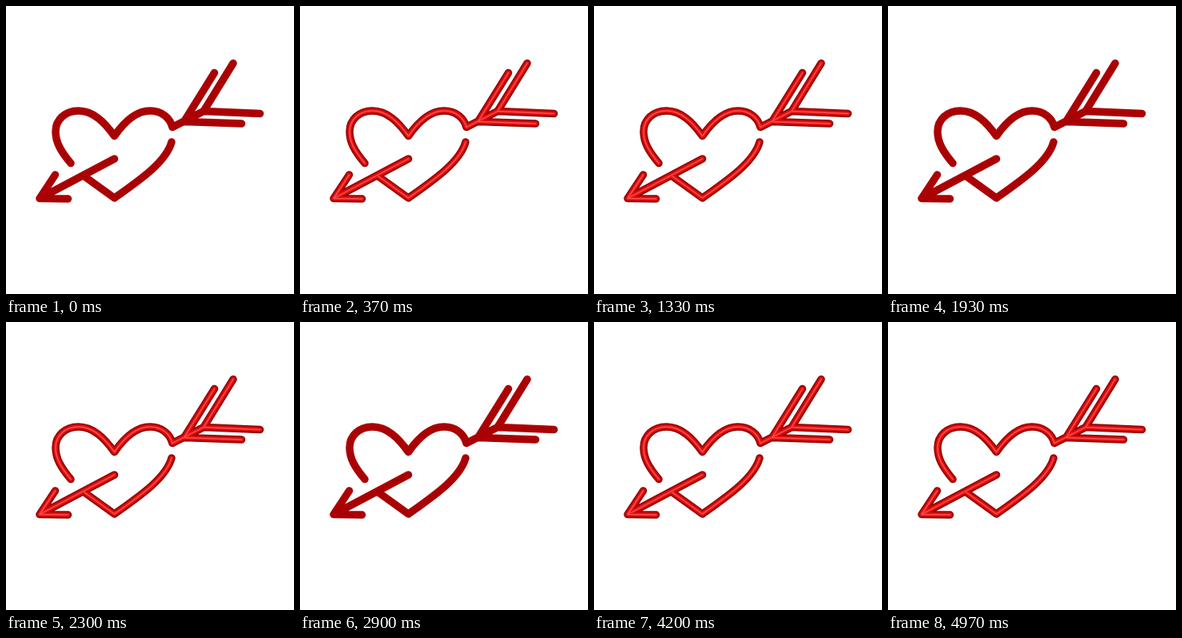
Animation of 360 by 360 pixels, one loop 5.1 s. Source, as an HTML page:

```html
<!DOCTYPE html>
<html lang="en">
<head>
<meta charset="utf-8">
<title>Neon heart</title>
<style>
html, body { margin: 0; width: 100%; height: 100%; overflow: hidden; background: #fff; }
svg { display: block; width: 100vw; height: 100vh; fill: none; stroke-linecap: round; stroke-linejoin: round; }
</style>
</head>
<body>
<svg viewBox="0 0 360 360">
  <defs>
    <path id="sign" d="
      M81 196.5C68 181 62 170 62 157C62 142 74 131 90.5 131C109 131 123 145 135.5 162.5
      C149 143 163 131 180 131C195 131 205 140 208 151.5L247 131.5
      M207 170C200 195 168 217 135.500 240L98 213
      M135.500 191L42 240.500M61.500 211L42 240.500L77.500 241
      M260.500 83.500L222.500 144.500L294.500 147
      M284 71.500L247 131.500L317.500 134.500"/>
  </defs>
  <use id="off" href="#sign" stroke="#aa0204" stroke-width="9.5"/>
  <g id="on">
    <use href="#sign" stroke="#8a0404" stroke-width="9.5"/>
    <use href="#sign" stroke="#b00606" stroke-width="7.4"/>
    <use href="#sign" stroke="#d20a0a" stroke-width="5.4"/>
    <use href="#sign" stroke="#e81c1c" stroke-width="3.2"/>
    <use href="#sign" stroke="#fa4a4a" stroke-width="1.4"/>
  </g>
</svg>
<script>
const LOOP = 5100;
// The lamp starts dark and toggles at each of these times (ms).
const toggles = [
  170, 300, 370, 970, 1130, 1270, 1330, 1930, 2100, 2230, 2300,
  2900, 3070, 3200, 3270, 3870, 4030, 4140, 4200, 4800, 4970
];
const on = document.getElementById('on');
const off = document.getElementById('off');
const start = performance.now();

function draw() {
  const t = (performance.now() - start) % LOOP;
  const lit = toggles.filter(time => time <= t).length % 2 === 1;
  on.style.display = lit ? '' : 'none';
  off.style.display = lit ? 'none' : '';
  requestAnimationFrame(draw);
}
draw();
</script>
</body>
</html>
```
